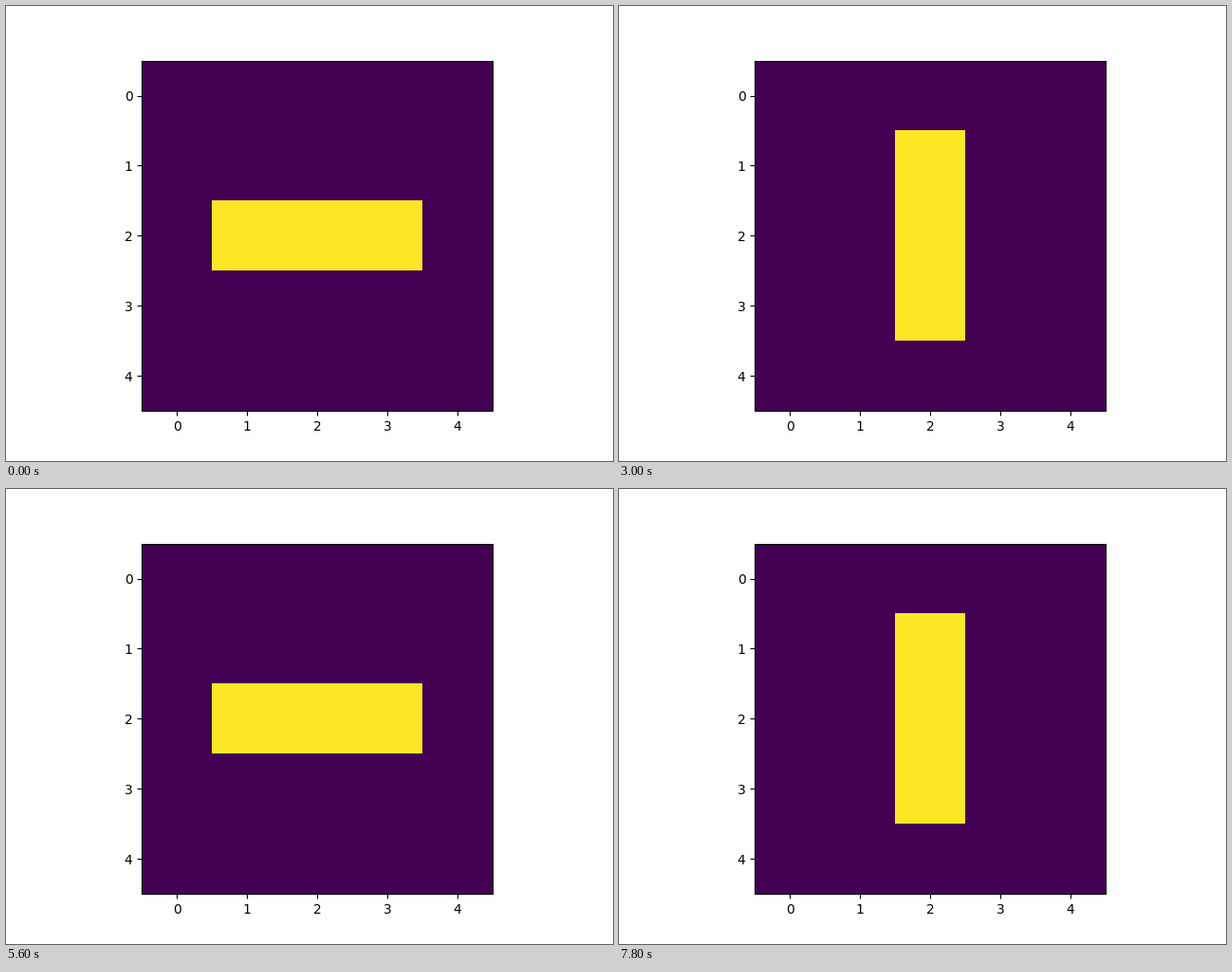
Animation, 640 px wide and 480 px high, one loop 8 s. Source, as a matplotlib script:

```python
import matplotlib.pyplot as plt
import numpy as np
from matplotlib.animation import FuncAnimation

SIZE = 5
FRAMES = 40
INTERVAL = 200


def step(grid):
    """Advance the Game of Life by one generation on a wrapped grid."""
    neighbours = sum(
        np.roll(grid, (dy, dx), axis=(0, 1))
        for dy in (-1, 0, 1)
        for dx in (-1, 0, 1)
        if (dy, dx) != (0, 0)
    )
    alive = (neighbours == 3) | ((grid == 1) & (neighbours == 2))
    return alive.astype(int)


blinker = np.zeros((SIZE, SIZE), dtype=int)
blinker[2, 1:4] = 1

generations = [blinker]
while len(generations) < FRAMES:
    generations.append(step(generations[-1]))

fig, ax = plt.subplots(figsize=(6.4, 4.8), dpi=100)
image = ax.imshow(blinker, cmap="viridis", vmin=0, vmax=1)


def update(frame):
    image.set_data(generations[frame])
    return (image,)


anim = FuncAnimation(fig, update, frames=FRAMES, interval=INTERVAL,
                     repeat=True, repeat_delay=0)
plt.show()
```
